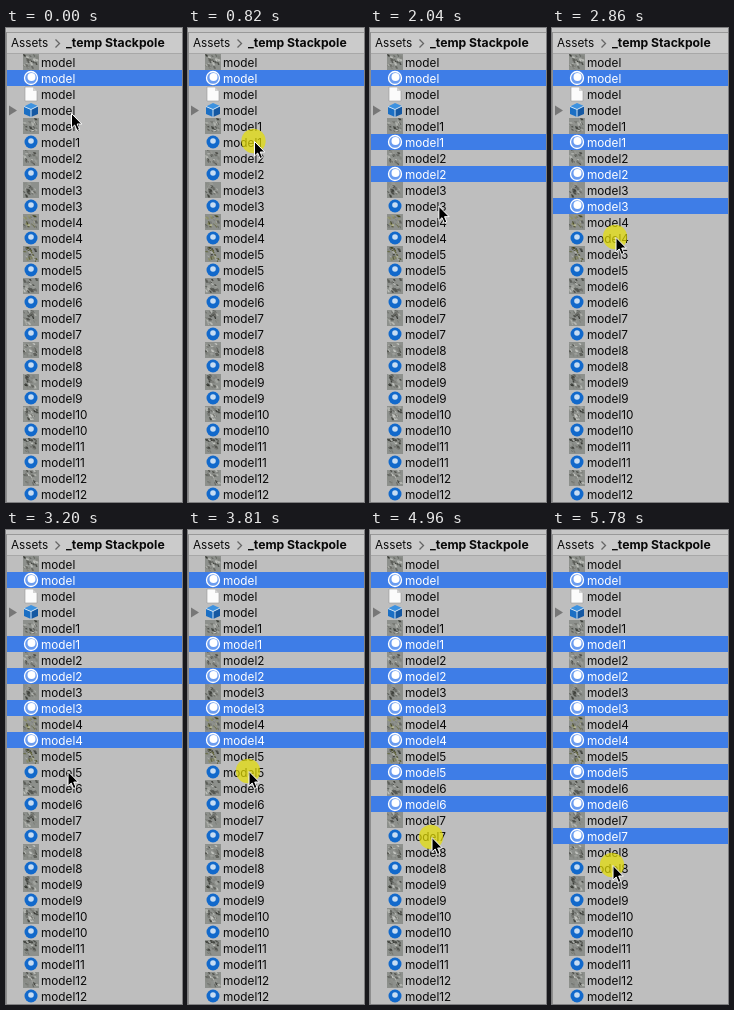
Recreate the animation shown at these times as an HTML page. Size 176 by 474 pixels, loop 5850 ms.

```html
<!DOCTYPE html>
<html lang="en">
<head>
<meta charset="utf-8">
<title>Asset list selection</title>
<style>
  html, body { margin: 0; width: 100%; height: 100%; overflow: hidden; background: #bebebe; }
  svg { display: block; width: 176px; height: 474px; }
  text { font: 11.75px Inter, "Open Sans", sans-serif; fill: #090909; white-space: pre; }
  .bold { font-size: 12.2px; font-weight: 700; }
  .bar { fill: none; }
  .ball { fill: #1269cb; }
  .shine { fill: #c6dcf3; }
  .on .bar { fill: #3e7de7; }
  .on text { fill: #fff; }
  .on .ball { fill: #6a9cf0; stroke: #fff; stroke-width: 1.3px; }
  .on .shine { fill: #fff; transform: translate(.5px, 0); r: 4px; }
</style>
</head>
<body>
<svg id="stage" viewBox="0 0 176 474">
  <rect width="176" height="474" fill="#bebebe"/>
  <rect width="176" height="4" fill="#c6c6c6"/>
  <rect y="4" width="176" height="21" fill="#cbcbcb"/>
  <rect y="4" width="176" height="1" fill="#999"/>
  <rect y="25" width="176" height="1" fill="#a8a8a8"/>
  <text x="5" y="19">Assets</text>
  <path d="M49.5 11.5l4 4-4 4" fill="none" stroke="#666" stroke-width="1.3"/>
  <text x="60" y="19" class="bold">_temp Stackpole</text>
  <g id="rows"></g>
  <rect y="4" width="1" height="470" fill="#8e8e8e"/>
  <circle id="halo" cx="-.5" r="12.2" fill="#e6de00" fill-opacity=".7"/>
  <path id="cursor" d="M.5 .5V15L3.700 12 6 17.500 8.500 16.400 6.200 11H10.800Z"
        fill="#000" stroke="#fff" stroke-width="1"/>
</svg>
<script>
const LOOP = 5850, ROWS = 28, ROW_H = 16, TOP = 26;
const byId = id => document.getElementById(id);

let seed = 11;
const rand = () => (seed = (seed * 16807) % 2147483647) / 2147483647;

// A small aerial-looking texture made of grey patches.
function thumb(n) {
  const green = n === 4 || n === 5;
  let out = '<rect x="17" width="16" height="16" fill="#8d908c"/>';
  for (let i = 0; i < 30; i++) {
    const v = Math.floor(55 + rand() * 140);
    const tint = green && rand() < .4 ? 35 : 3;
    const x = 17 + Math.floor(rand() * 13), y = Math.floor(rand() * 13);
    const w = 1 + rand() * 2, h = 1 + rand() * 2;
    out += `<path d="M${x} ${y}l${w} ${rand()}l1 ${h}l${-w} 0z" fill="rgb(${v},${v + 2},${v - tint})"/>`;
  }
  return out;
}

const ball = '<circle class="ball" cx="25" cy="8" r="6.5"/>' +
  '<circle class="shine" cx="25" cy="7" r="2.8"/>';
const page = '<path d="M19 1h8l4 4v10H19z" fill="#fbfbfb" stroke="#999" stroke-width=".6"/>' +
  '<path d="M27 1v4h4z" fill="#d2d2d2"/>';
const cube = '<path d="M3 3.5l8 5-8 5z" fill="#777"/>' +
  '<path d="M18 4.5L25 1l7 3-7 3.5z" fill="#3d92e0"/>' +
  '<path d="M18 4.5l7 3V15l-7-3z" fill="#1b6fc4"/>' +
  '<path d="M32 4l-7 3.5V15l7-3z" fill="#1558a2"/>' +
  '<path d="M18 4.5l7 3 7-3.5M25 7.5V15" fill="none" stroke="#cfe3f5"/>';

function icon(i) {
  if (i === 2) return page;
  if (i === 3) return cube;
  return i % 2 ? ball : thumb(i / 2 - 1);
}

byId('rows').innerHTML = Array.from({ length: ROWS }, (_, i) => {
  const n = i < 4 ? '' : Math.floor(i / 2) - 1;
  return `<g transform="translate(0 ${TOP + ROW_H * i})">
    <rect class="bar" x="1" width="175" height="${ROW_H}"/>${icon(i)}<text x="35" y="13">model${n}</text></g>`;
}).join('');
const rows = [...byId('rows').children];
rows[1].classList.add('on');

// Clicks on every second row: press time, position, overshoot before settling.
const clicks = [
  [820, 66, 113, 12], [1630, 62, 146, 0], [2240, 69, 181, 0], [2860, 63.5, 209, 0],
  [3810, 60.5, 241, 17], [4360, 61, 274, 0], [4960, 61.5, 307, 0], [5780, 60.5, 335, -1]
].map(([press, x, y, over], k) => ({ press, x, y, over, row: rows[5 + 2 * k] }));

const STEP = 70, HOLD = 2 * STEP, TRAVEL = 4 * STEP;

// Eased progress that advances once per step.
function progress(t, start, length) {
  const p = (Math.floor((t - start) / STEP) + 1) * STEP / (length + STEP);
  return (1 - Math.cos(Math.PI * Math.max(0, Math.min(1, p)))) / 2;
}

function cursorAt(t) {
  let x = 65, y = 85, start = STEP;
  for (const c of clicks) {
    if (t < start) break;
    const p = progress(t, start, TRAVEL);
    const settle = progress(t, c.press - 2 * HOLD, HOLD);
    x += (c.x - x) * p;
    y += (c.y + c.over - y) * p - c.over * settle;
    start = c.press + HOLD;
  }
  return [x, y];
}

function draw(t) {
  const place = `translate(${cursorAt(t).join(' ')})`;
  byId('cursor').setAttribute('transform', place);
  byId('halo').setAttribute('transform', place);
  const pressed = clicks.some(c => t >= c.press && t < c.press + HOLD);
  byId('halo').style.display = pressed ? '' : 'none';
  for (const c of clicks) c.row.classList.toggle('on', t >= c.press + STEP);
}

const begin = performance.now();
function tick() {
  draw((performance.now() - begin) % LOOP);
  requestAnimationFrame(tick);
}
tick();
</script>
</body>
</html>
```
